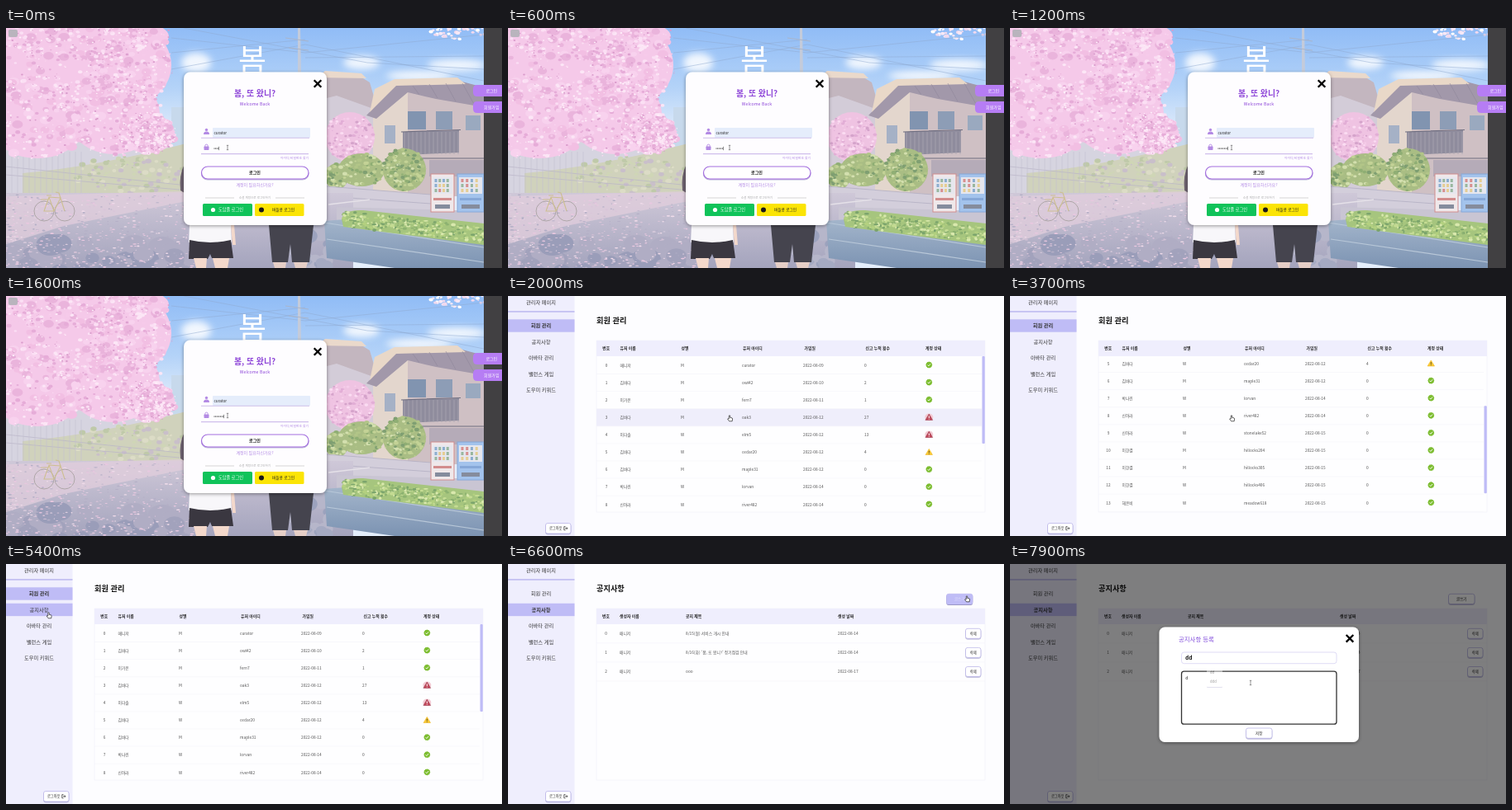
Recreate the animation shown at these times as an HTML page. Size 600 by 291 pixels, loop 8 s.

```html
<!DOCTYPE html>
<html lang="ko">
<head>
<meta charset="utf-8">
<title>회원 관리</title>
<style>
html, body { margin: 0; width: 100%; height: 100%; overflow: hidden; background: #fdfdff; }
svg { display: block; width: 100%; height: 100%; font-family: "Noto Sans CJK KR", "Noto Sans CJK", "Noto Sans", sans-serif; }
</style>
</head>
<body>
<svg id="stage" viewBox="0 0 600 291" xmlns="http://www.w3.org/2000/svg"></svg>
<script>
const LOOP = 8000, STEP = 100;
const ROW_H = 21.1, TABLE_TOP = 73, VIEW_H = 189;
const stage = document.getElementById('stage');

let seed = 11;
const rnd = () => (seed = (seed * 16807) % 2147483647) / 2147483647;
const between = (a, b) => a + rnd() * (b - a);
const pick = list => list[Math.floor(rnd() * list.length)];
const times = (n, fn) => Array.from({ length: n }, (_, i) => fn(i)).join('');

// y is the vertical middle of the glyphs
const text = (x, y, s, size, fill = '#222', more = '') =>
  `<text x="${x}" y="${y + size * .36}" font-size="${size}" fill="${fill}" ${more}>${s}</text>`;
const mid = 'text-anchor="middle" ', bold = 'font-weight="700"';
const rect = (x, y, w, h, fill, more = '') =>
  `<rect x="${x}" y="${y}" width="${w}" height="${h}" fill="${fill}" ${more}/>`;
const path = (d, fill, more = '') => `<path d="${d}" fill="${fill}" ${more}/>`;
const line = (d, stroke, w = 1) => path(d, 'none', `stroke="${stroke}" stroke-width="${w}"`);
const oval = (x, y, rx, ry, fill, more = '') =>
  `<ellipse cx="${x}" cy="${y}" rx="${rx}" ry="${ry}" fill="${fill}" ${more}/>`;
const group = (id, body, more = '') => `<g id="${id}" ${more}>${body}</g>`;
const button = (x, y, w, h, label, size) =>
  rect(x, y, w, h, '#fff', 'rx="2.5" stroke="#b3aee6" stroke-width=".7" filter="url(#soft)"') +
  text(x + w / 2, y + h / 2, label, size, '#222', mid);
const cross = (x, y) =>
  line(`M${x - 4.3} ${y - 4.3}l8.6 8.6m0 -8.6l-8.6 8.6`, '#000', 2.3);

const defs = `<defs>
  <linearGradient id="sky" x2="0" y2="1"><stop stop-color="#90bcf6"/><stop offset=".25" stop-color="#b4d3f8"/><stop offset=".45" stop-color="#e4eefb"/></linearGradient>
  <linearGradient id="road" x2="0" y2="1"><stop stop-color="#cfc8d8"/><stop offset="1" stop-color="#a4a4bd"/></linearGradient>
  <linearGradient id="planter" x2="0" y2="1"><stop stop-color="#a3b5cb"/><stop offset="1" stop-color="#7c93b2"/></linearGradient>
  <filter id="blur" x="-50%" y="-50%" width="200%" height="200%"><feGaussianBlur stdDeviation="4"/></filter>
  <filter id="soft" x="-20%" y="-30%" width="140%" height="180%"><feDropShadow dx="0" dy="1" stdDeviation=".7" flood-color="#5a54a0" flood-opacity=".4"/></filter>
  <filter id="lift" x="-20%" y="-20%" width="140%" height="140%"><feDropShadow dx="0" dy="1" stdDeviation="2" flood-opacity=".4"/></filter>
  <clipPath id="view">${rect(107, TABLE_TOP, 471, VIEW_H, '#000')}</clipPath>
  <clipPath id="picture">${rect(0, 0, 578, 291, '#000')}</clipPath>
</defs>`;

// random dabs of colour inside an ellipse
const dabs = (n, [cx, cy, rx, ry], r0, r1, colors) => times(n, () => {
  const a = between(0, 2 * Math.PI), d = Math.sqrt(rnd()), r = between(r0, r1);
  return oval((cx + Math.cos(a) * d * rx).toFixed(1), (cy + Math.sin(a) * d * ry).toFixed(1), r.toFixed(1), (r * .75).toFixed(1), pick(colors));
});
const foliage = (n, area) => oval(...area, '#a9bd84') + dabs(n, area, .8, 3, ['#c3d296', '#8fae74', '#b2c588', '#7f9f72', '#d3dfae']);
const pinkTree = (n, area) => oval(...area, '#efc3e2') + dabs(n, area, .7, 2.5, ['#fbdcf2', '#e2aed6', '#f6cdea', '#d5a3cb']);

function blossoms() {
  const crowns = [[55, 40, 88, 54], [150, 45, 50, 48], [38, 108, 62, 50], [130, 105, 56, 48], [85, 10, 112, 28], [172, 128, 32, 24]];
  const layer = (n, r0, r1, spread, colors) =>
    crowns.map(([x, y, w, h]) => dabs(n, [x, y, w * spread, h * spread], r0, r1, colors)).join('');
  return crowns.map(c => oval(...c, '#f5c9e9')).join('') +
    layer(45, 3, 7, 1, ['#f2bfe3', '#f8d2ee', '#eab4dc']) +
    layer(110, 1, 3, 1.05, ['#fbdff4', '#f6caea', '#fce6f6', '#e6acd8']) +
    layer(90, .5, 1.4, 1.08, ['#fff0fa', '#fad8f0', '#d99bcb']);
}

function houses() {
  return path('M362 100L390 62L432 66L446 104V196H362Z', '#d3ccd8') +
    path('M360 92L384 54L424 56L440 66L450 100L400 82Z', '#c3b6bf') + path('M376 60L386 52L430 55L436 61Z', '#ead9cb') +
    rect(378, 104, 10, 16, '#a6b5cb') +
    path('M444 104L486 74L578 80V204H444Z', '#cfc0c4') + path('M444 104L486 74L486 204H444Z', '#e3d6cd') +
    path('M436 106L472 68L548 64L578 72V96L520 86L486 78L448 110Z', '#a298aa') +
    path('M446 74L470 62L546 60L556 68L472 70L440 102Z', '#e9d8c8') +
    line('M492 70L500 81M512 68L522 85M532 67L544 89M552 67L566 92', '#8f879b', .6) +
    rect(486, 101, 22, 22, '#8194b0') + rect(520, 101, 20, 22, '#8d9db6') + rect(556, 106, 18, 18, '#9aa9bf') +
    path('M480 126L548 124V151L480 154Z', '#8f8c9d') +
    times(14, i => line(`M${482 + i * 5} 126v27`, '#aaa6b1', .8)) +
    line('M478 126L550 123.5M486 158H578', '#6f6e80', 1.2) +
    rect(458, 118, 13, 22, '#a5b1c6') + rect(512, 160, 66, 20, '#b5abb8');
}

function vending(x, w, trim, body) {
  return rect(x, 177, w, 46, body, `stroke="${trim}"`) + rect(x + 2, 181, w - 4, 20, '#e6e7ee') +
    times(12, i => rect(x + 4.5 + (i % 4) * (w - 9) / 4, 183 + Math.floor(i / 4) * 6, 3, 4, pick(['#d88f8f', '#8daed0', '#e5cd94', '#99b79f']))) +
    rect(x + 3, 206, w - 6, 3, trim) + rect(x + 5, 214, w - 10, 5, '#858c9d');
}

function bicycle() {
  const wheel = x => `<circle cx="${x}" cy="222" r="12" fill="none" stroke="#aaa3a3" stroke-width=".9"/>`;
  return wheel(46) + wheel(71) + line('M46 222L52 205L66 206L58 222ZM52 205L58 222M71 222L64 200L60 199M49 203H55M42 208H52', '#cdbf92', 1.1);
}

function street() {
  return rect(0, 200, 420, 91, 'url(#road)') +
    dabs(35, [140, 280, 150, 22], 6, 18, ['#a2a2bc', '#b0adc4', '#9a9db9']) +
    dabs(25, [390, 262, 40, 30], 5, 14, ['#a5aac2', '#b6b6ca', '#9ba2bd']) +
    path('M0 204L216 198L218 210L70 240L0 262Z', '#e0cddd', 'opacity=".8"') +
    times(650, () => oval((Math.pow(rnd(), 1.3) * 230).toFixed(1), between(202, 291).toFixed(1), between(.6, 2.4).toFixed(1), between(.3, .9).toFixed(1), pick(['#f0dcea', '#e9c8e0', '#d9c5d9', '#b4afc6']))) +
    line('M390 214L440 208', '#e5e1e8', 1.5);
}

function people() {
  return path('M222 239H272L273 260H221Z', '#f8f7fa') + path('M222 257Q247 263 272 257L275 279H249L247 274L244 280H221Z', '#3a3740') +
    path('M227 279h16l-1 12h-12ZM250 279h20l-2 12h-15Z', '#f3d8cb') +
    path('M272 239h4l2 24h-4Z', '#f3d8cb') + path('M216 165Q209 178 211 197L216 200Z', '#6e6270') +
    path('M318 239H372L367 284H346L344 262L341 284H322Z', '#45444e') +
    path('M323 284h16l-1 7h-13ZM348 284h17l-2 7h-13Z', '#e6cfc7');
}

function scenery() {
  const clouds = [[405, 68, 28, 9], [430, 42, 22, 8], [545, 45, 35, 7], [230, 42, 18, 12], [345, 72, 45, 12], [500, 58, 40, 6]];
  return `<g clip-path="url(#picture)">` + rect(0, 0, 578, 291, 'url(#sky)') +
    clouds.map(c => oval(...c, '#fff', 'opacity=".85" filter="url(#blur)"')).join('') +
    dabs(90, [560, 2, 48, 12], .8, 3, ['#fff', '#f8e8f6', '#f1d9ee']) +
    line('M200 12L362 30L578 8M200 50L362 20L578 64M215 0L437 42L578 50M362 36L578 34M200 30L362 14', '#8fa9cf', .5) +
    path('M353 0h3l1 60h-4Z', '#c4cbda') + line('M338 12l28 4M342 24l24 3', '#a9b5cb', 1) +
    rect(0, 130, 240, 75, '#d6d4e0') + rect(200, 96, 18, 60, '#c7d9ec') +
    path('M20 176Q110 168 218 140V202H20Z', '#d0d2bc') +
    dabs(120, [150, 178, 72, 22], 1, 4, ['#dcdcc6', '#bfc9a9', '#cfd6b6', '#c9bfca']) +
    line('M0 168L210 190M0 178L210 196', '#b9b5c8', .7) +
    times(14, i => line(`M${i * 7} 150v54`, '#c3bfd0', .6)) +
    houses() +
    pinkTree(150, [416, 132, 30, 30]) + foliage(70, [430, 172, 28, 20]) + foliage(140, [482, 172, 26, 26]) + foliage(50, [400, 180, 14, 16]) +
    path('M388 192L514 202V228L388 226Z', '#d3cedb') + line('M388 192L514 202M388 204L514 213', '#b3afc3', .8) +
    street() + path('M400 217L578 222V245H400Z', '#c9c5d3') +
    vending(514, 28, '#d28d8d', '#efe8ea') + vending(546, 32, '#86a8d8', '#a3c3ec') +
    path('M385 234L410 232L578 250V291H470L388 279Z', 'url(#planter)') +
    line('M385 236L578 266M388 256L578 284', '#b8c7d8', 1.2) +
    path('M406 232Q408 220 432 221L578 237V263L408 241Z', '#a6c57e') +
    times(300, () => {
      const x = between(408, 578);
      return oval(x.toFixed(1), (between(222, 241) + (x - 410) * .115).toFixed(1), between(.8, 3).toFixed(1), between(.6, 2).toFixed(1), pick(['#c5dc93', '#8db271', '#b3d080', '#7aa36c', '#d9e8ad']));
    }) +
    blossoms() + bicycle() + people() + '</g>' +
    text(298, 40, '봄', 37, '#fff', mid + 'font-weight="300"') +
    rect(3, 2, 11, 9, '#b9b4bd', 'rx="2"') +
    rect(578, 0, 22, 291, '#414042') +
    [['로그인', 69], ['회원가입', 89]].map(([s, y]) =>
      path(`M600 ${y}H570Q565 ${y} 565 ${y + 5}V${y + 9}Q565 ${y + 14} 570 ${y + 14}H600Z`, '#b67df4') +
      text(587.3, y + 7, s, 5, '#fff', mid)).join('');
}

function loginCard() {
  const purple = '#8d45d8', pale = '#b38ae4';
  return rect(215, 53.5, 173, 185.5, '#fefdff', 'rx="8" filter="url(#lift)"') + cross(377, 67.5) +
    text(301, 79, '봄, 또 왔니?', 9.9, purple, mid + bold) +
    text(301, 91.7, 'Welcome Back', 5.3, purple, mid) +
    oval(242.5, 123.4, 1.7, 1.7, pale) + path('M239 129q0 -3.4 3.5 -3.4t3.5 3.4Z', pale) +
    rect(250, 121, 118, 12, '#e5edfb', 'rx="1"') + line('M236 133.3H367', '#c3b2e4', .8) +
    text(251.5, 127, 'curator', 4.6) +
    rect(239.5, 143.6, 6, 4.4, pale, 'rx=".7"') + line('M240.8 144v-1.2a1.7 1.7 0 0 1 3.4 0V144', pale, .9) +
    line('M236 152.7H366', '#b59be0', .8) + '<g id="secret"></g>' +
    text(366, 157.7, '아이디/비밀번호 찾기', 3.8, pale, 'text-anchor="end"') +
    rect(236.5, 168, 129.5, 15, '#fff', 'rx="7.5" stroke="#a46fdf" stroke-width="1.2" filter="url(#soft)"') +
    text(301, 175.3, '로그인', 5, '#111', mid + bold) +
    text(301, 190.5, '계정이 필요하신가요?', 5, pale, mid) +
    line('M241 206H276M326 206H361', '#bbb', .6) +
    text(301, 205.7, '소셜 계정으로 로그인하기', 3.6, '#aaa', mid) +
    rect(238, 213, 60, 15, '#10c35a', 'rx="1.5"') + oval(250.5, 220.5, 2.6, 2.6, '#fff') +
    text(272, 220.5, '도담풀 로그인', 5.2, '#fff', mid) +
    rect(301, 213, 59.5, 15, '#fbe405', 'rx="1.5"') + oval(309, 220.5, 3, 3, '#1b1718') +
    text(335.5, 220.5, '버들콩 로그인', 4.7, '#222', mid);
}

const badges = {
  ok: path(`M${Array.from({ length: 24 }, (_, i) => {
    const r = i % 2 ? 3.5 : 4.1, a = i * Math.PI / 12;
    return (r * Math.cos(a)).toFixed(2) + ' ' + (r * Math.sin(a)).toFixed(2);
  }).join('L')}Z`, '#7dbd31') + line('M-1.7 .1L-.5 1.4L1.8 -1.2', '#fff', .9),
  bad: oval(0, 0, 5, 4.3, '#f3cbd4') + path('M0 -3.8L4.4 3.6H-4.4Z', '#c2485a', 'stroke="#93364b" stroke-width=".5"') + line('M0 -1.5V1.2M0 2V2.8', '#fff', 1),
  warn: path('M0 -3.6L4.2 3.5H-4.2Z', '#f9c935', 'stroke="#f0b522" stroke-width=".6" stroke-linejoin="round"') + line('M0 -1.3V1.2M0 1.9V2.7', '#4c4020', .9)
};

// name, gender, id, day of August, reports
const members = `매니저 M curator 09 0
김바다 M owl42 10 2
이가온 M fern7 11 1
김바다 M oak3 12 27
이다솔 W elm5 12 13
김바다 W cedar20 12 4
김바다 M maple31 12 0
박나린 W lorvan 14 0
신아라 W river482 14 0
신아라 W stonelake52 15 0
이한결 M hillocks204 15 0
이한결 M hillocks305 15 0
이한결 W hillocks406 15 0
해온비 W meadow618 15 0
해온비 W meadow729 15 0
박나린 M lorvan8 15 0`.split('\n').map(r => r.split(' '));

const headers = (labels, xs) => labels.map((s, i) => text(xs[i], 63.2, s, 4.85, '#222', (i ? '' : mid) + bold)).join('');
const cells = (y, values, xs) => values.map((s, i) => text(xs[i], y, s, 4.8, '#555', (i ? '' : mid) + 'font-weight="300"')).join('');

function memberRow([name, sex, id, day, reports], i) {
  const y = 84 + i * ROW_H;
  const state = reports > 10 ? 'bad' : reports > 3 ? 'warn' : 'ok';
  return cells(y, [i, name, sex, id, '2022-08-' + day, reports], [119, 135.5, 209, 283, 357, 431]) +
    `<g transform="translate(509.3 ${y - .5})">${badges[state]}</g>` +
    line(`M107 ${y + 10.5}H573`, '#f4f3f9', .6);
}

const notices = [
  ['매니저', '8/15(월) 서비스 개시 안내', '2022-08-14'],
  ['매니저', "8/16(화) '봄, 또 왔니?' 정기점검 안내", '2022-08-14'],
  ['매니저', 'ooo', '2022-08-17']
];
const noticeRow = (row, i) => {
  const y = 84.3 + i * 23.1;
  return cells(y, [i, ...row], [118.5, 135, 215, 399]) + button(553.5, y - 6, 18.5, 12, '삭제', 4.3) +
    line(`M107 ${y + 11.5}H577`, '#f1f0f8', .6);
};

const menuItems = ['회원 관리', '공지사항', '아바타 관리', '밸런스 게임', '도우미 키워드'];
const menuY = i => 36 + i * 19.45;

function adminFrame() {
  return rect(0, 0, 600, 291, '#fdfdff') + rect(0, 0, 80.5, 291, '#efeefd') +
    text(40, 8, '관리자 페이지', 6.2, '#333', mid) + rect(0, 18.2, 80.5, 1.5, '#bbb8f0') +
    menuItems.map((s, i) => rect(0, menuY(i) - 7.7, 80.5, 15.4, '#bfbcf6', `id="bar${i}"`) +
      text(40, menuY(i), s, 6.2, '#333', `${mid} id="item${i}"`)).join('') +
    button(45.5, 275.5, 30.5, 12.5, '', 4) + text(50, 281.6, '로그아웃', 4.2) +
    line('M69.5 279.6H67.8V283.8H69.5M69 281.7H71.8M70.6 280.3L72 281.7L70.6 283.1', '#222', .7) +
    rect(107, 54, 470, 208, '#fefeff', 'stroke="#f1f0f8" stroke-width=".7"') + rect(107, 54, 470, 19, '#efeefd');
}

const memberPage = text(107, 30, '회원 관리', 9.2, '#111', bold) +
  headers(['번호', '유저 이름', '성별', '유저 아이디', '가입일', '신고 누적 횟수', '계정 상태'], [118.8, 135.5, 209.5, 284, 358.5, 432.5, 505]) +
  group('memberRows', `<g clip-path="url(#view)">${group('scroller',
    rect(107, 0, 466, ROW_H, '#efeefb', 'id="rowHover"') + members.map(memberRow).join(''))}</g>` +
    rect(573.5, TABLE_TOP, 3.3, 106, '#bfbcf6', 'id="thumb" rx="1"'));

const noticePage = text(107, 30, '공지사항', 9.2, '#111', bold) +
  headers(['번호', '생성자 이름', '공지 제목', '생성 날짜'], [118.5, 135, 215, 399]) +
  group('noticeRows', notices.map(noticeRow).join('') + button(530.5, 36.3, 31.5, 12.2, '글쓰기', 4.5) +
    group('writeHover', rect(530.5, 36.3, 31.5, 12.8, '#bfbcf6', 'rx="2.5" filter="url(#soft)"') + text(546.2, 42.6, '글쓰기', 4.5, '#dddcfa', mid)));

const dialog = rect(0, 0, 600, 291, '#000', 'opacity=".5"') +
  rect(180.5, 76.5, 241.5, 139.5, '#fff', 'rx="7" filter="url(#lift)"') + cross(411, 90.3) +
  text(204, 91, '공지사항 등록', 7.4, '#8451dc') +
  rect(207.5, 107, 187.5, 13.7, '#fff', 'id="titleBox" rx="3"') + text(212, 113.6, '', 6.6, '#111', bold + ' id="titleText"') +
  rect(207.5, 130.2, 187.5, 64, '#fff', 'id="bodyBox" rx="3"') + text(212.3, 138.3, '', 5, '#222', 'id="bodyText"') +
  group('hints', rect(238, 125, 19, 24, '#fff', 'rx="1" filter="url(#soft)"') + text(242, 131, 'dd', 4.2) + text(242, 142, 'ddd', 4.2)) +
  button(285.5, 199, 31.5, 12.3, '저장', 4.5);

const cursors = group('ibeam', line('M-1.2 -2.7H1.2M0 -2.7V2.7M-1.2 2.7H1.2', '#333', .5)) +
  group('arrow', path('M0 0V7L1.7 5.5L2.8 8L3.9 7.5L2.8 5.1H5Z', '#fff', 'stroke="#111" stroke-width=".6"')) +
  group('hand', path('M-.7 3.5V.1Q0 -1 .7 .1V2.4L3 2.9Q3.7 3.2 3.6 4L3.2 6.8H-.4L-2.4 4Q-2 3 -.7 4Z', '#fff', 'stroke="#111" stroke-width=".65" stroke-linejoin="round"'));

stage.innerHTML = defs + group('login', scenery() + loginCard()) +
  group('admin', adminFrame() + group('members', memberPage) + group('notices', noticePage) + group('dialog', dialog)) +
  group('cursor', cursors);

const ui = {};
stage.querySelectorAll('[id]').forEach(node => ui[node.id] = node);
const show = (node, on) => node.setAttribute('display', on ? 'inline' : 'none');
const set = (node, attrs) => Object.entries(attrs).forEach(([k, v]) => node.setAttribute(k, v));

// keys: [time, ...values], eased between neighbours
function track(keys, t) {
  const next = keys.findIndex(k => k[0] > t);
  if (next === 0) return keys[0].slice(1);
  if (next < 0) return keys[keys.length - 1].slice(1);
  const a = keys[next - 1], b = keys[next];
  const p = (t - a[0]) / (b[0] - a[0]), e = p * p * (3 - 2 * p);
  return a.slice(1).map((v, i) => v + (b[i + 1] - v) * e);
}

const pointerKeys = [[0, 268, 145], [4500, 268, 145], [5300, 51.5, 59], [5850, 51.5, 59], [6500, 555, 39],
  [6750, 555, 39], [7250, 291, 114], [7550, 291, 114], [7700, 291, 144]];
const scrollKeys = [[2800, 0], [3700, 107.5], [3900, 125], [4000, 125], [4600, 0]];

const focusRing = (node, on) => set(node, { stroke: on ? '#333' : '#d6d2f3', 'stroke-width': on ? 1.3 : .8 });

function render(t) {
  const loginOn = t < 1800, noticeOn = t >= 5500, dialogOn = t >= 6700;
  const [x, y] = track(pointerKeys, t), [scroll] = track(scrollKeys, t);
  show(ui.login, loginOn);
  show(ui.admin, !loginOn);
  show(ui.members, !noticeOn);
  show(ui.notices, noticeOn);
  show(ui.dialog, dialogOn);

  const typed = 4 + Math.min(4, Math.floor((t + 100) / 250));
  ui.secret.innerHTML = times(typed, i => oval(252 + i * 1.5, 146, .62, .62, '#222')) +
    line(`M${251.5 + typed * 1.5} 143.8v4.4`, '#222', .5);

  const rowsOn = t >= 2000;
  show(ui.memberRows, rowsOn);
  const inTable = !noticeOn && rowsOn && x > 107 && x < 573 && y > TABLE_TOP && y < 262;
  const scrolling = t >= 2900 && t < 4600;
  const row = scrolling ? 3 : Math.floor((y - TABLE_TOP) / ROW_H);
  show(ui.rowHover, inTable);
  set(ui.rowHover, { y: 73.4 + row * ROW_H });
  set(ui.scroller, { transform: `translate(0 ${-scroll})` });
  set(ui.thumb, { y: TABLE_TOP + scroll * .56 });

  const active = noticeOn ? 1 : 0;
  const overMenu = !dialogOn && x < 80 ? Math.round((y - 36) / 19.45) : -1;
  menuItems.forEach((_, i) => {
    show(ui['bar' + i], i === active || i === overMenu);
    set(ui['item' + i], { 'font-weight': i === active ? 700 : 400 });
  });

  show(ui.noticeRows, t >= 5600);
  const overWrite = noticeOn && !dialogOn && x > 530 && x < 562 && y > 36 && y < 49;
  show(ui.writeHover, overWrite);

  const titleFocus = t >= 7300 && t < 7800;
  focusRing(ui.titleBox, titleFocus);
  focusRing(ui.bodyBox, t >= 7800);
  ui.titleText.textContent = 'd'.repeat(t < 7400 ? 0 : t < 7600 ? 1 : 2);
  ui.bodyText.textContent = t >= 7900 ? 'd' : '';
  show(ui.hints, t >= 7400);
  set(ui.hints, { opacity: t >= 7900 ? .45 : t >= 7800 ? .8 : 1 });

  const overField = dialogOn && x < 395 && y > 105;
  const kind = loginOn || overField ? 'ibeam' : inTable || overMenu >= 0 || overWrite ? 'hand' : 'arrow';
  ['ibeam', 'hand', 'arrow'].forEach(k => show(ui[k], k === kind));
  set(ui.cursor, { transform: `translate(${x} ${y})` });
}

const start = performance.now();
let drawn = -1;
function tick() {
  const t = Math.floor((performance.now() - start) % LOOP / STEP) * STEP;
  if (t !== drawn) render(drawn = t);
  requestAnimationFrame(tick);
}
tick();
</script>
</body>
</html>
```
